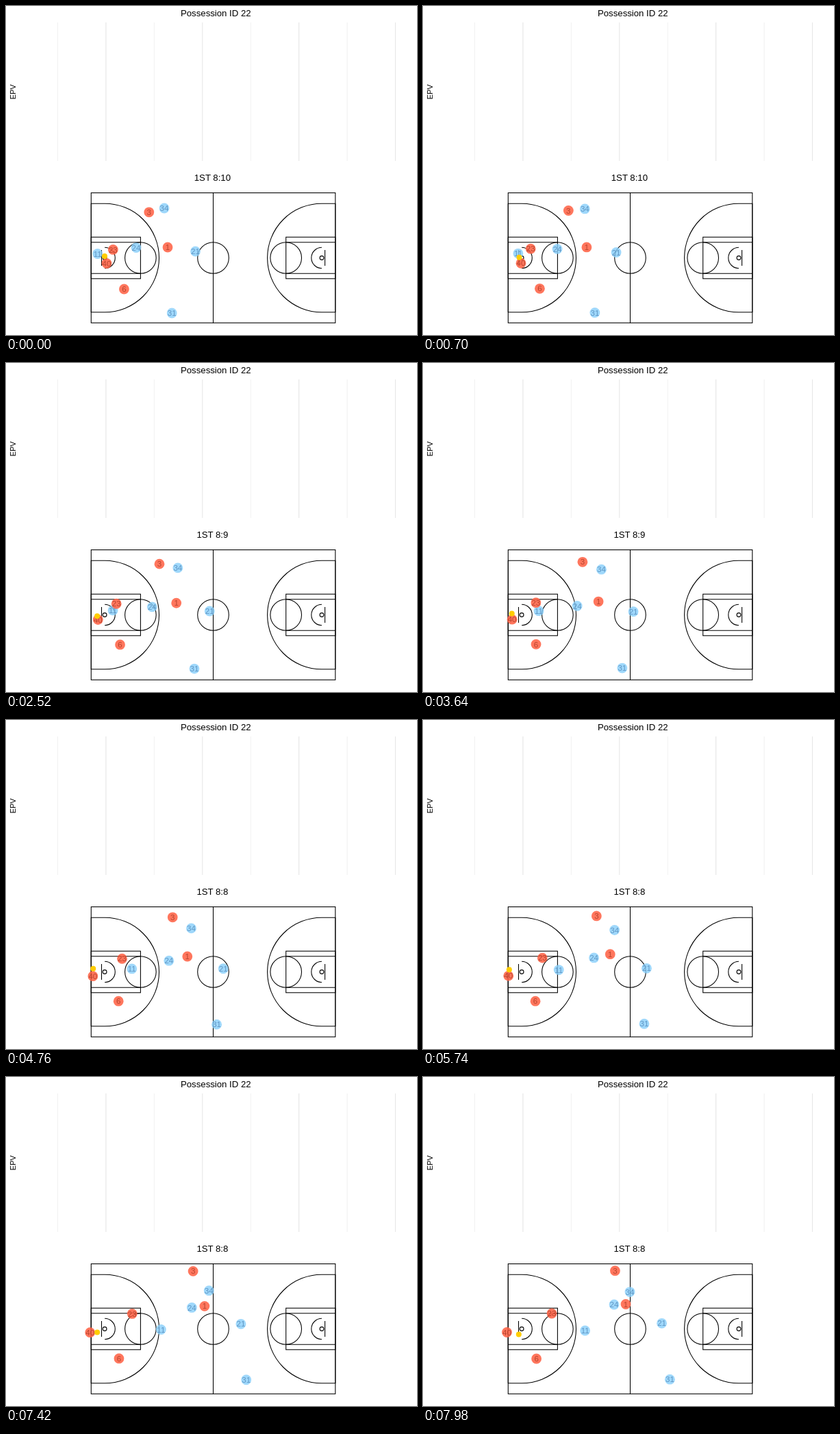
An HTML page that plays this animation: 600 by 480 pixels, repeating every 8 s.

```html
<!DOCTYPE html>
<html lang="en">
<head>
<meta charset="utf-8">
<title>Possession</title>
<style>
  html, body { margin: 0; width: 100%; height: 100%; overflow: hidden; background: #fff; }
  svg { display: block; }
  text { font-family: "Liberation Sans", Arial, sans-serif; text-anchor: middle; }
  .title { font-size: 13.2px; }
  .axis { font-size: 11px; }
  .court { fill: none; stroke: #000; stroke-width: 1.07; }
  .num { font-size: 11.5px; }
</style>
</head>
<body>
<svg width="600" height="480" viewBox="0 0 600 480">
  <g id="grid"></g>
  <text class="title" x="306.3" y="15">Possession ID 22</text>
  <text class="axis" transform="translate(13.8 125.3) rotate(-90)">EPV</text>
  <text class="title" id="clock" x="301.4" y="255"></text>
  <g class="court">
    <rect x="124.3" y="272.6" width="356.5" height="189.7"/>
    <path d="M302.5 272.6V462.3"/>
    <circle cx="302.5" cy="367.5" r="22.8"/>
    <g id="half">
      <path d="M124.3 288.3H144.3A79.2 79.2 0 0 1 144.3 446.7H124.3Z"/>
      <rect x="124.3" y="337.2" width="72.1" height="60.6"/>
      <path d="M124.3 344.8H196.4M124.3 390.2H196.4"/>
      <circle cx="196.4" cy="367.5" r="22.8"/>
      <circle cx="144.1" cy="367.5" r="2.9"/>
      <path d="M139.5 356.1V378.9M144.1 352.3A15.2 15.2 0 0 1 144.1 382.7"/>
    </g>
    <use href="#half" transform="translate(605.1 0) scale(-1 1)"/>
  </g>
  <g id="dots"></g>
</svg>
<script>
const STEP = 140, LOOP = 8000, LAST = 57;
const $ = id => document.getElementById(id);
const movers = [];

function add(parent, tag, attrs, text = '') {
  const el = document.createElementNS('http://www.w3.org/2000/svg', tag);
  for (const name in attrs) el.setAttribute(name, attrs[name]);
  el.textContent = text;
  return parent.appendChild(el);
}

// place(step) gives the [x, y] of the dot
function dot(radius, { fill, opacity }, place) {
  const el = add($('dots'), 'g', {});
  add(el, 'circle', { r: radius, fill, 'fill-opacity': opacity });
  movers.push({ el, place });
  return el;
}

// A smooth run through three points: at the start, halfway and at the end
function run(from, mid, to) {
  return step => {
    const u = step / LAST, w = 1 - u;
    return from.map((a, i) => w * (w - u) * a + 4 * u * w * mid[i] + u * (u - w) * to[i]);
  };
}

function player(number, team, place) {
  add(dot(7.4, team, place), 'text', { class: 'num', y: 4.1, fill: team.ink }, number);
}

for (let i = 0; i < 8; i++) {
  const x = 75.5 + 70.43 * i;
  add($('grid'), 'path', { d: `M${x} 24V226`, stroke: '#e6e6e6', 'stroke-width': i % 2 ? 1.1 : 0.6 });
}

const blue = { fill: '#87cefa', opacity: 0.8, ink: '#5f96c4' };
const red = { fill: '#ff6347', opacity: 0.88, ink: '#b8452f' };
const gold = { fill: '#ffcd00', opacity: 1 };

player(34, blue, run([231, 295], [263.5, 302], [302, 313.6]));
player(24, blue, run([190, 352.6], [229, 353.6], [279, 332]));
player(11, blue, run([133.6, 361.5], [173.4, 362], [236.6, 370]));
player(21, blue, run([276.5, 358], [310.2, 362.8], [348.6, 359.3]));
player(31, blue, run([242.2, 448], [296, 444.8], [360.4, 441.2]));

const passer = run([147, 375.5], [129, 374], [122.5, 372.5]);
player(3, red, run([208.8, 300.8], [236, 289.5], [280.4, 282.7]));
player(1, red, run([236, 352], [258.7, 347.2], [296, 331.5]));
player(23, red, run([156.3, 355.4], [166.2, 349.2], [188, 345]));
player(40, red, passer);
player(6, red, run([172.4, 413], [164.7, 410.3], [165.6, 411]));

// The ball bobs in the passer's hands, then is thrown in
dot(4, gold, step => {
  const [x, y] = passer(step);
  const thrown = Math.max(0, (step - 48) / (LAST - 48));
  const bob = Math.cos((step - 34) / 6);
  return [x - 3 + 0.1 * step + 14.6 * thrown, y - 8 - 3 * bob + 8.6 * thrown];
});

const start = performance.now();
function draw() {
  const step = Math.floor((performance.now() - start) % LOOP / STEP);
  $('clock').textContent = '1ST 8:' + Math.floor(10.3 - 0.04 * step);   // 25 steps per game second
  for (const { el, place } of movers)
    el.setAttribute('transform', `translate(${place(step)})`);
  requestAnimationFrame(draw);
}
draw();
</script>
</body>
</html>
```
